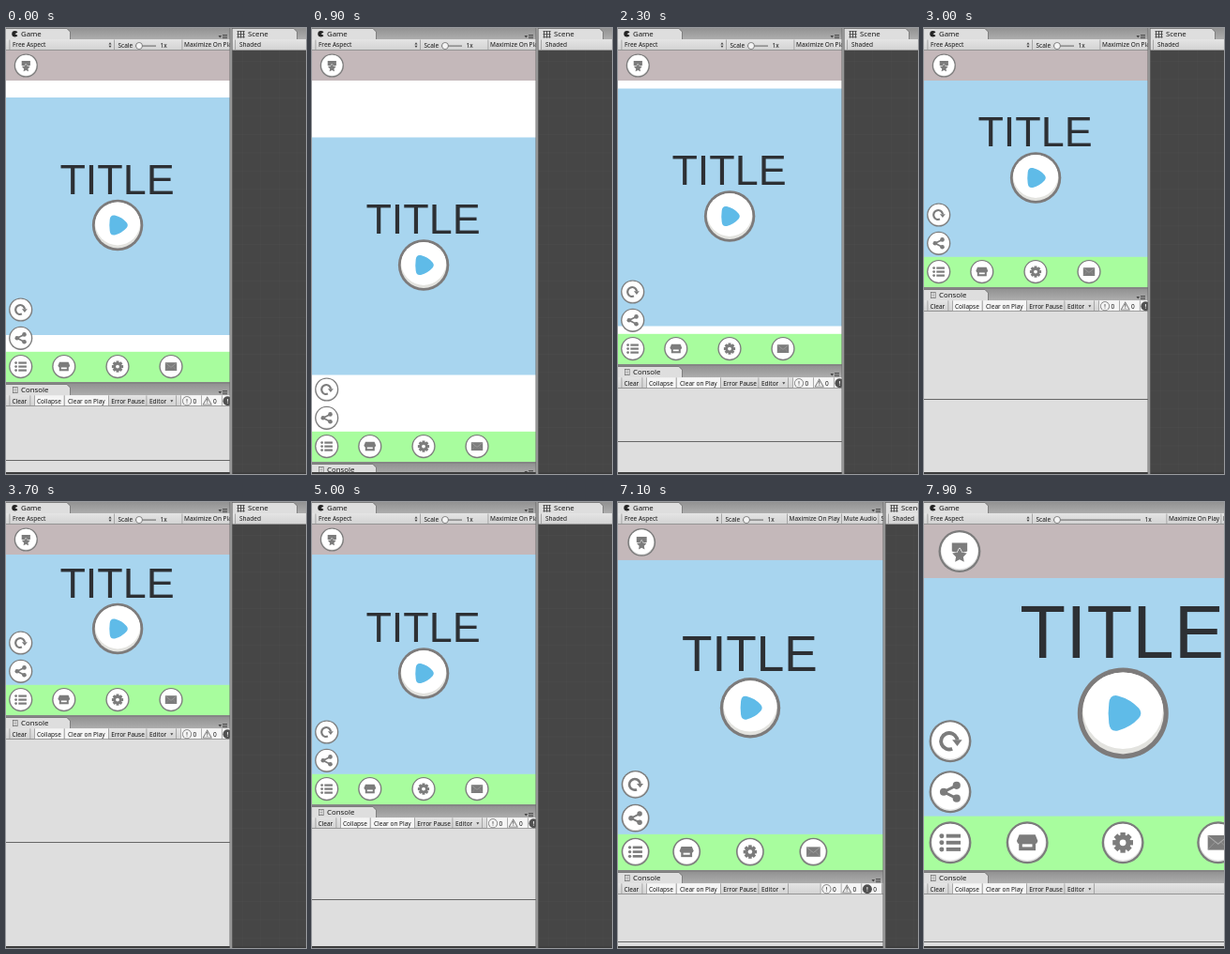
An HTML page with a canvas for the animation above (8000 ms loop, 320 by 475 pixels).

```html
<!DOCTYPE html>
<html lang="en">
<head>
<meta charset="utf-8">
<title>Editor layout</title>
<style>
html, body { margin: 0; width: 320px; height: 475px; overflow: hidden; background: #a5a5a5; }
canvas { display: block; width: 320px; height: 475px; }
</style>
</head>
<body>
<canvas id="stage"></canvas>
<script>
const WIDTH = 320, HEIGHT = 475, LOOP = 8000, STEP = 100;
const TOP = 24;
const canvas = document.getElementById('stage');
const ratio = window.devicePixelRatio || 1;
canvas.width = WIDTH * ratio;
canvas.height = HEIGHT * ratio;
const ctx = canvas.getContext('2d');

const GRAY = '#7c7c7c';
const UI_FONT = '"Noto Sans", "Open Sans", sans-serif';

// [time, bottom edge of the game view]
const bottomKeys = [[0, 377], [900, 462], [1200, 465], [1400, 465], [2300, 357.5], [3200, 258],
  [3700, 227], [4100, 248], [5000, 321.5], [5900, 391], [6300, 392], [8000, 392]];
// [time, width of the left column]
const widthKeys = [[0, 239], [6600, 239], [7100, 283], [7900, 426], [8000, 440]];
// [game bottom, console divider]
const splitKeys = [[227, 362], [321.5, 423], [357.5, 440], [377, 460], [392, 468], [470, 475]];
// [column width, toolbar offset]
const squeezeKeys = [[239, 0], [283, -5], [355, 0], [500, 0]];

// Monotone cubic interpolation through the keys.
function curve(keys, x) {
  const last = keys.length - 1;
  if (x <= keys[0][0]) return keys[0][1];
  if (x >= keys[last][0]) return keys[last][1];
  const slope = i => (keys[i + 1][1] - keys[i][1]) / (keys[i + 1][0] - keys[i][0]);
  const tangent = i => {
    if (i === 0) return slope(0);
    if (i === last) return slope(last - 1);
    const a = slope(i - 1), b = slope(i);
    return a * b <= 0 ? 0 : 2 * a * b / (a + b);
  };
  let i = 0;
  while (keys[i + 1][0] < x) i++;
  const h = keys[i + 1][0] - keys[i][0], u = (x - keys[i][0]) / h;
  const v = 1 - u;
  return keys[i][1] * v * v * (1 + 2 * u) + keys[i + 1][1] * u * u * (3 - 2 * u)
    + h * u * v * (tangent(i) * v - tangent(i + 1) * u);
}

function rect(x, y, w, h, color) {
  ctx.fillStyle = color;
  ctx.fillRect(x, y, w, h);
}

function disc(x, y, r, color) {
  ctx.fillStyle = color;
  ctx.beginPath();
  ctx.arc(x, y, r, 0, Math.PI * 2);
  ctx.fill();
}

function poly(points, color) {
  ctx.fillStyle = color;
  ctx.beginPath();
  points.forEach(([x, y]) => ctx.lineTo(x, y));
  ctx.closePath();
  ctx.fill();
}

function line(points, color, width) {
  ctx.strokeStyle = color;
  ctx.lineWidth = width;
  ctx.beginPath();
  points.forEach(([x, y]) => ctx.lineTo(x, y));
  ctx.stroke();
}

function label(str, x, middle, size = 6.5, color = '#151515') {
  ctx.font = `${size}px ${UI_FONT}`;
  ctx.fillStyle = color;
  ctx.fillText(str, x, middle + size * 0.36);
}

function clipped(x, y, w, h, paint) {
  ctx.save();
  ctx.beginPath();
  ctx.rect(x, y, w, h);
  ctx.clip();
  paint();
  ctx.restore();
}

function shade(x, y, w, h, from, to) {
  const g = ctx.createLinearGradient(0, y, 0, y + h);
  g.addColorStop(0, from);
  g.addColorStop(1, to);
  rect(x, y, w, h, g);
}

function tabBar(x, y, w, tabWidth, title, titleX = 16) {
  shade(x, y, w, 12, '#929292', '#adadad');
  poly([[x, y + 12], [x, y + 1], [x + tabWidth - 3, y + 1], [x + tabWidth, y + 4], [x + tabWidth, y + 12]], '#dedede');
  line([[x, y + 0.5], [x + tabWidth - 3, y + 0.5], [x + tabWidth + 0.5, y + 4], [x + tabWidth + 0.5, y + 12]], '#777', 0.8);
  label(title, x + titleX, y + 6.5, 7.8);
  shade(x, y + 12, w, 12, '#e4e4e4', '#d2d2d2');
  rect(x, y + 23.2, w, 0.8, '#868686');
}

function panelMenu(right, y) {
  poly([[right - 12.5, y + 8], [right - 9, y + 8], [right - 10.75, y + 10.5]], '#444');
  for (let i = 0; i < 3; i++) rect(right - 8, y + 7 + i * 1.7, 5, 0.8, '#444');
}

function separator(x, y) {
  rect(x, y, 0.8, 11, '#999');
}

const icons = {
  medal() {
    poly([[-4.6, -5], [4.6, -5], [4.6, 0], [0, 1.5], [-4.6, 0]], GRAY);
    const star = Array.from({ length: 10 }, (_, i) => {
      const r = i % 2 ? 2.3 : 4.6, a = -Math.PI / 2 + i * Math.PI / 5;
      return [r * Math.cos(a), 2.6 + r * Math.sin(a)];
    });
    line([...star, star[0]], '#fff', 0.8);
    poly(star, GRAY);
  },
  list() {
    for (const y of [-4, 0, 4]) {
      disc(-5.1, y, 1.4, GRAY);
      rect(-2.4, y - 1.1, 8.6, 2.2, GRAY);
    }
  },
  store() {
    poly([[-4.8, -4.8], [4.8, -4.8], [6.3, -1], [5.6, 0.6], [-5.6, 0.6], [-6.3, -1]], GRAY);
    rect(-5, 0, 10, 4.7, GRAY);
    rect(-3, 0.9, 6, 1.7, '#fff');
  },
  gear() {
    for (let i = 0; i < 8; i++) {
      ctx.save();
      ctx.rotate(i * Math.PI / 4);
      rect(-1.5, -6.1, 3, 3, GRAY);
      ctx.restore();
    }
    disc(0, 0, 4.7, GRAY);
    disc(0, 0, 1.9, '#fff');
  },
  mail() {
    rect(-6.2, -4.4, 12.4, 8.8, GRAY);
    line([[-6, -4], [0, 0.8], [6, -4]], '#aaa', 0.6);
    line([[-6, 4], [-1.7, -0.4]], '#a0a0a0', 0.4);
    line([[6, 4], [1.7, -0.4]], '#a0a0a0', 0.4);
  },
  refresh() {
    ctx.strokeStyle = GRAY;
    ctx.lineWidth = 2.2;
    ctx.beginPath();
    ctx.arc(-0.6, 0, 4.9, Math.PI * 0.38, Math.PI * 1.95);
    ctx.stroke();
    poly([[1.2, -0.8], [7.1, -0.8], [4.2, 2.9]], GRAY);
  },
  share() {
    line([[3.8, -3.9], [-3.9, 0], [3.8, 3.9]], GRAY, 1.7);
    for (const [x, y] of [[-3.9, 0], [3.8, -3.9], [3.8, 3.9]]) disc(x, y, 2.3, GRAY);
  }
};

function at(x, y, scale, paint) {
  ctx.save();
  ctx.translate(x, y);
  ctx.scale(scale, scale);
  paint();
  ctx.restore();
}

function roundButton(x, y, scale, icon) {
  at(x, y, scale, () => {
    disc(0, 0, 12.6, GRAY);
    disc(0, 0, 11.3, '#e2e2e2');
    disc(0, -0.4, 10.9, '#fff');
    icon();
  });
}

function playButton(x, y, scale) {
  at(x, y, scale, () => {
    disc(0, 0, 27.2, '#7d7b7b');
    disc(0, 0, 24.4, '#e3e3df');
    ctx.save();
    ctx.beginPath();
    ctx.arc(0, 0, 24.4, 0, Math.PI * 2);
    ctx.clip();
    disc(0, -2.6, 24, '#fff');
    ctx.restore();
    ctx.fillStyle = '#5fbbe8';
    ctx.beginPath();
    ctx.moveTo(-8.4, -6);
    ctx.quadraticCurveTo(-7.8, -11.4, -3, -10.4);
    ctx.quadraticCurveTo(4.6, -8.4, 9.4, -3);
    ctx.quadraticCurveTo(12, 0, 9.4, 3);
    ctx.quadraticCurveTo(4.6, 8.4, -3, 10.4);
    ctx.quadraticCurveTo(-7.8, 11.4, -8.4, 6);
    ctx.quadraticCurveTo(-9.2, 0, -8.4, -6);
    ctx.fill();
  });
}

function gameView(width, bottom) {
  const s = width / 239, middle = (TOP + bottom) / 2, cx = width / 2;
  clipped(0, TOP, width, bottom - TOP, () => {
    rect(0, TOP, width, bottom - TOP, '#fff');
    rect(0, middle - 126.5 * s, width, 253 * s, '#a8d5ef');
    rect(0, TOP, width, 32 * s, '#c4b8ba');
    rect(0, bottom - 32.2 * s, width, 32.2 * s, '#a8fd9e');

    ctx.font = `${44.9 * s}px "Liberation Sans", Arial, sans-serif`;
    ctx.fillStyle = '#2d3034';
    ctx.textAlign = 'center';
    ctx.fillText('TITLE', cx - s, middle - 23.7 * s);
    ctx.textAlign = 'left';
    playButton(cx - 0.4 * s, middle + 9.5 * s, s);

    const row = bottom - 16.4 * s;
    roundButton(21.3 * s, TOP + 16 * s, s, icons.medal);
    roundButton(15.7 * s, row - 60.6 * s, s, icons.refresh);
    roundButton(15.7 * s, row - 30.3 * s, s, icons.share);
    [icons.list, icons.store, icons.gear, icons.mail].forEach((icon, i) =>
      roundButton([15.7, 61.8, 119, 176][i] * s, row, s, icon));
  });
}

function gameBar(width) {
  clipped(0, 0, width, TOP, () => {
    tabBar(0, 0, width, 68, 'Game');
    disc(9.5, 6.3, 3.2, '#222');
    poly([[9.5, 6.3], [13, 4.3], [13, 8.3]], '#dedede');
    panelMenu(width, 0);

    const dx = curve(squeezeKeys, width);
    const extra = Math.max(0, width - 355);
    separator(3.5, 12.5);
    label('Free Aspect', 7, 18);
    poly([[109.5 + dx, 17.4], [112.5 + dx, 17.4], [111 + dx, 15.2]], '#444');
    poly([[109.5 + dx, 18.8], [112.5 + dx, 18.8], [111 + dx, 21]], '#444');
    separator(115 + dx, 12.5);
    label('Scale', 119.5 + dx, 18.8);
    rect(138 + dx, 18.5, 22 + extra, 1.2, '#777');
    disc(142 + dx, 19, 3.7, '#777');
    disc(142 + dx, 19, 2.9, '#f4f4f4');
    label('1x', 164.5 + dx + extra, 18.5);
    const x = 190 + dx * 1.5 + extra;
    separator(x - 2.5, 12.5);
    label('Maximize On Play', x, 18);
    separator(x + 55.5, 12.5);
    label('Mute Audio', x + 58, 18);
    separator(x + 95, 12.5);
    label('Stats', x + 98, 18);
  });
}

function counter(x, y, kind) {
  if (kind === 1) {
    poly([[x, y - 5], [x + 5.2, y + 4.4], [x - 5.2, y + 4.4]], '#777');
    poly([[x, y - 3.2], [x + 3.8, y + 3.6], [x - 3.8, y + 3.6]], '#ececec');
  } else {
    disc(x, y, 5, kind ? '#555' : '#777');
    disc(x, y, 4.2, kind ? '#505050' : '#f4f4f4');
  }
  const ink = kind === 2 ? '#eee' : '#666';
  rect(x - 0.5, y - 2.2, 1, 2.8, ink);
  rect(x - 0.5, y + 1.4, 1, 1, ink);
  label('0', x + 6.4, y);
}

function consoleView(width, bottom) {
  const y = bottom + 2, middle = y + 18.2, pressed = '#f5f5f5';
  clipped(0, bottom, width, HEIGHT - bottom, () => {
    rect(0, bottom, width, 2, '#858585');
    rect(0, y + 24, width, HEIGHT, '#dedede');
    tabBar(0, y, width, 68, 'Console');
    rect(7, y + 3, 5.5, 7, '#666');
    rect(7.7, y + 3.7, 4.1, 5.6, '#eee');
    for (let i = 0; i < 3; i++) rect(8.4, y + 4.6 + i * 1.6, 2.7, 0.6, '#777');
    panelMenu(width, y);

    const first = Math.max(193, width - 60.5);
    rect(30.5, y + 12.3, 31, 10.8, pressed);
    rect(63, y + 12.3, 46, 10.8, pressed);
    rect(first - 6.5, y + 12.3, 66, 10.8, pressed);
    [3.5, 25.5, 30, 61.8, 109, 149.5, 181].forEach(x => separator(x, y + 12.3));
    label('Clear', 6.5, middle);
    label('Collapse', 33, middle);
    label('Clear on Play', 66, middle);
    label('Error Pause', 112.3, middle);
    label('Editor', 153, middle);
    poly([[175.3, middle - 1], [178.3, middle - 1], [176.8, middle + 1.4]], '#444');

    separator(first - 6.8, y + 12.3);
    for (let i = 0; i < 3; i++) {
      counter(first + i * 21.7, middle, i);
      separator(first + 15.2 + i * 21.7, y + 12.3);
    }
    const split = curve(splitKeys, bottom);
    if (split > y + 24) rect(0, Math.round(split), width, 1, '#666');
  });
  rect(0, 473, width, 2, '#3c3c3c');
}

function sceneView(left) {
  if (left >= WIDTH) return;
  const x = left + 2, w = WIDTH - x;
  clipped(x, 0, w, HEIGHT, () => {
    tabBar(x, 0, w, 69, 'Scene', 17);
    for (const d of [6.5, 9.5, 12.5]) {
      rect(x + d - 0.4, 3, 0.9, 7.5, '#444');
      rect(x + 5.5, d - 3.2, 8.2, 0.9, '#444');
    }
    separator(x + 3, 12.5);
    label('Shaded', x + 8, 18);
    rect(x, TOP, w, HEIGHT, '#464646');
    for (let gx = x + 11; gx < WIDTH; gx += 19.5) rect(gx, TOP, 0.8, HEIGHT, 'rgba(255,255,255,.025)');
    for (let gy = 35; gy < HEIGHT; gy += 19.5) rect(x, gy, w, 0.8, 'rgba(255,255,255,.025)');
    rect(x, 473.5, w, 1.5, '#3a3a3a');
  });
  rect(left - 0.5, 0, 1, HEIGHT, '#6a6a6a');
  rect(left + 0.5, 0, 1.5, HEIGHT, '#a2a2a2');
  rect(left + 1.8, 0, 0.8, HEIGHT, '#6a6a6a');
}

function draw(time) {
  const width = Math.round(curve(widthKeys, time));
  const bottom = Math.round(curve(bottomKeys, time));
  ctx.setTransform(ratio, 0, 0, ratio, 0, 0);
  rect(0, 0, WIDTH, HEIGHT, '#a5a5a5');
  gameView(width, bottom);
  gameBar(width);
  consoleView(width, bottom);
  sceneView(width);
}

const start = performance.now();
function tick() {
  const elapsed = (performance.now() - start) % LOOP;
  draw(Math.floor(elapsed / STEP) * STEP);
  requestAnimationFrame(tick);
}
tick();
</script>
</body>
</html>
```
